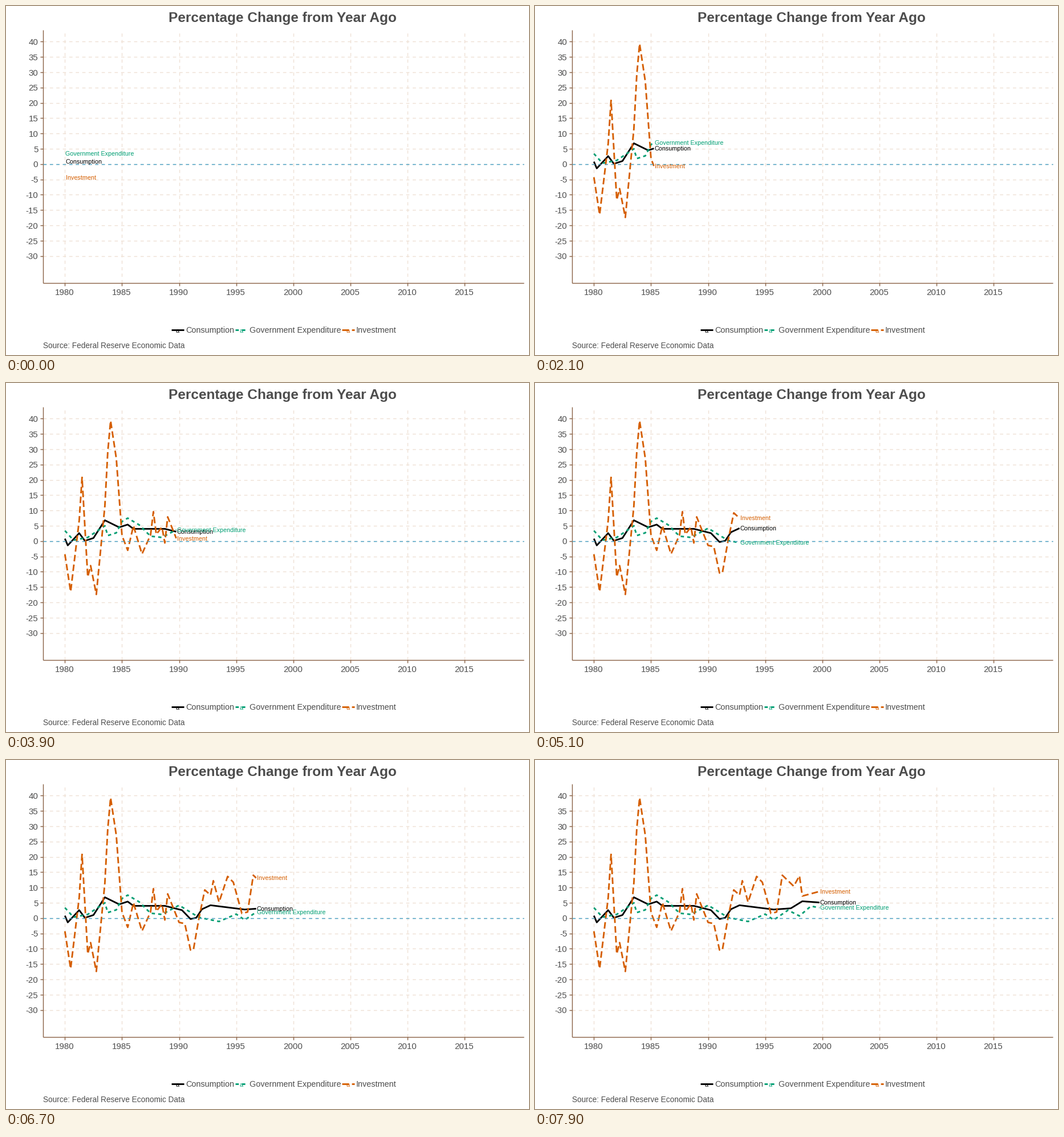
Animation, 917 px wide and 611 px high, one loop 8 s. Source, as a matplotlib script:

```python
import numpy as np
import matplotlib.pyplot as plt
from matplotlib.animation import FuncAnimation

plt.rcParams["font.family"] = "Liberation Sans"

W, H, DPI = 917, 611, 100
FRAMES, INTERVAL = 80, 100
PT = 72 / DPI
LEFT, RIGHT, TOP, BOTTOM = 65, 908, 42, 485
THIN, THICK = 1.42, 2.85

GRAY, BROWN, GRID, ZERO = "#4d4d4d", "#8a6347", "#efe1d5", "#46a0c4"
DASHED = (0, (4, 4))

# Turning points as (quarters since 1980, percent), joined by straight lines
CONSUMPTION = [
    (0, 0.8), (1, -1.4), (5, 2.6), (7, 0.1), (10, 1), (14, 6.8), (19, 4.5),
    (22, 5.4), (24, 4), (35, 4), (41, 2.6), (44, -0.3), (46, 0.1),
    (48, 2.9), (51, 4.2), (63, 2.8), (69, 3.2), (73, 5.5), (79, 5.1)]
GOVERNMENT = [
    (0, 3.4), (3, 0.3), (8, 1.2), (14, 5), (15, 1.8), (18, 2.7), (20, 6.4),
    (22, 7.5), (26, 5.3), (30, 1.6), (34, 1.2), (40, 4.2), (47, 0.2),
    (54, -1.1), (60, 1.3), (63, -0.6), (68, 2.6), (72, 0.7), (76, 3.9),
    (79, 3.4)]
INVESTMENT = [
    (0, -4.3), (2, -16.5), (5, 6.7), (6, 20.8), (8, -11.7), (9, -8),
    (11, -17.4), (14, 11.5), (15, 29), (16, 39.3), (18, 27), (20, 1.8),
    (22, -3), (24, 5), (27, -4.2), (30, 2), (31, 9.6), (32, 2.2),
    (34, 4.6), (35, -0.6), (36, 7.9), (40, -1.4), (42, -1.8), (44, -10.4),
    (45, -10.4), (47, 0.2), (49, 9.2), (51, 7.5), (52, 12.2), (54, 5.2),
    (57, 13.6), (59, 11.7), (62, 1.5), (64, 2), (66, 14), (70, 10.4),
    (72, 13.8), (73, 7.2), (79, 8.7)]


def px(year):
    return 103.3 + 20.02 * (year - 1980)


def py(value):
    return 276.8 - 5.364 * value


fig = plt.figure(figsize=(W / DPI, H / DPI), dpi=DPI, facecolor="white")
ax = fig.add_axes([0, 0, 1, 1])
ax.set(xlim=(0, W), ylim=(H, 0))
ax.axis("off")


def line(xs, ys, color, width=THIN, style="-", z=1):
    return ax.plot(xs, ys, color=color, lw=width * PT, ls=style, zorder=z,
                   solid_capstyle="butt", dash_capstyle="butt",
                   solid_joinstyle="round", dash_joinstyle="round")[0]


def label(x, y, text, size, color=GRAY, ha="left", z=5, **kw):
    """Text whose capital letters are centred on y."""
    return ax.text(x, y + 0.36 * size, text, size=size * PT, color=color,
                   ha=ha, va="baseline", zorder=z, **kw)


# Grid, ticks and axes
for v in range(-30, 41, 5):
    y = py(v)
    line([LEFT, RIGHT], [y, y], GRID, style=DASHED)
    line([LEFT - 5, LEFT], [y, y], BROWN)
    label(56.3, y + 0.3, str(v), 15, ha="right")
for year in range(1980, 2016, 5):
    x = px(year)
    line([x, x], [BOTTOM, TOP], GRID, style=DASHED)
    line([x, x], [BOTTOM, BOTTOM + 5], BROWN)
    label(x - 0.5, 500.3, str(year), 15, ha="center")
line([LEFT, LEFT], [TOP, BOTTOM], BROWN, z=2)
line([LEFT, RIGHT], [BOTTOM, BOTTOM], BROWN, z=2)
line([LEFT, RIGHT], [py(0), py(0)], ZERO, style=DASHED, z=4)

label(484.8, 19.2, "Percentage Change from Year Ago", 24.4,
      ha="center", weight="bold")
label(LEFT, 594.2, "Source: Federal Reserve Economic Data", 13.58)

# Series with their legend keys
quarters = np.arange(FRAMES)
xs = px(1980 + quarters / 4)
series = []
for name, points, color, style, key in (
        ("Consumption", CONSUMPTION, "#000000", "-", 301),
        ("Government Expenditure", GOVERNMENT, "#009e73", (0, (2, 2)), 413),
        ("Investment", INVESTMENT, "#d55e00", (0, (4, 2)), 600)):
    line([key - 10.8, key + 10.8], [566.5, 566.5], color, THICK, style)
    label(key, 567.8, "a", 10.75, color, ha="center")
    label(key + 14, 567.2, name, 14.4)
    curve = line([], [], color, THICK, style, z=3)
    tag = label(0, 0, name, 10.75, color, z=6)
    series.append((py(np.interp(quarters, *zip(*points))), curve, tag))


def update(i):
    artists = []
    for ys, curve, tag in series:
        n = i + 1 if i else 0
        curve.set_data(xs[:n], ys[:n])
        tag.set_position((xs[i] + 1.2, ys[i] + 3.7))
        artists += [curve, tag]
    return artists


anim = FuncAnimation(fig, update, frames=FRAMES, interval=INTERVAL,
                     repeat=True, repeat_delay=0, blit=False)
plt.show()
```
